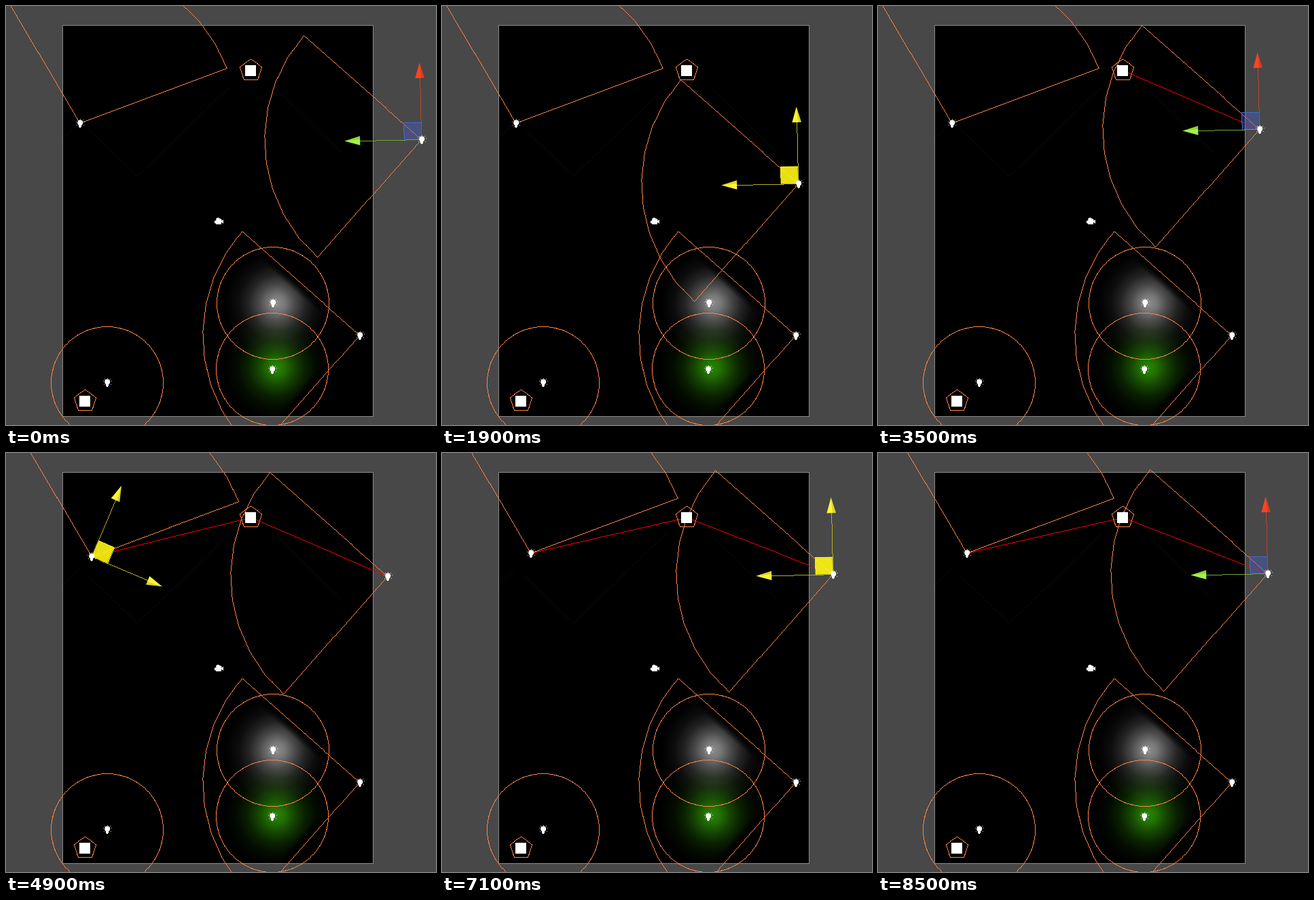
Recreate the animation shown at these times as an HTML page with a canvas. Size 633 px wide and 616 px high, loop 8.9 s.

```html
<!DOCTYPE html>
<html lang="en">
<head>
<meta charset="utf-8">
<title>2D light gizmos</title>
<style>
html, body { margin: 0; width: 100%; height: 100%; overflow: hidden; background: #484848; }
canvas { display: block; }
</style>
</head>
<body>
<canvas id="stage" width="633" height="616"></canvas>
<script>
const ctx = document.getElementById('stage').getContext('2d');
const LOOP = 8900, TICK = 100, RANGE = 231;
const ORANGE = '#ff8445', RED = '#f00000', FAINT = '#0a0a0a';
const target = { x: 360, y: 94.5 };
const spot = { x: 520.2, y: 483.7 };

// Drag paths: time, x, y
const rightPath = [
  [600, 611.2, 196], [800, 584, 182], [1000, 553, 165.7], [1100, 566, 171],
  [1300, 630, 186], [1500, 577, 174], [1700, 545, 215], [1900, 524.2, 261],
  [2000, 519, 266], [2200, 522, 250], [2400, 529, 214], [2600, 566, 190],
  [2800, 615, 178], [3000, 592, 178], [3200, 561.2, 181], [6300, 561.2, 181],
  [6500, 590, 180], [6700, 612, 179], [6900, 600, 178], [7100, 575.2, 178.2],
  [7250, 571, 179], [7500, 600, 182], [7700, 616, 184], [8000, 607, 184],
  [8300, 573.2, 177]
];
const leftPath = [[4600, 108.3, 172], [5000, 130.3, 147]];

// Handle state from each time on: time, owner, state
const handles = [
  [0, 'R', 'idle'], [300, 'R', 'axis'], [400, 'R', 'idle'], [500, 'R', 'plane'],
  [700, 'R', 'drag'], [3400, 'R', 'plane'], [3500, 'R', 'idle'],
  [4500, 'L', 'idle'], [4700, 'L', 'drag'], [5300, 'L', 'plane'], [5400, 'L', 'idle'],
  [6100, 'R', 'axis'], [6300, 'R', 'drag'], [8400, 'R', 'plane'], [8500, 'R', 'idle']
];

function follow(path, t) {
  const last = path[path.length - 1];
  if (t <= path[0][0]) return { x: path[0][1], y: path[0][2] };
  if (t >= last[0]) return { x: last[1], y: last[2] };
  const i = path.findIndex(p => p[0] > t) - 1;
  const a = path[i], b = path[i + 1];
  const u = (t - a[0]) / (b[0] - a[0]);
  const k = u * 0.5 + u * u * (3 - 2 * u) * 0.5;
  return { x: a[1] + (b[1] - a[1]) * k, y: a[2] + (b[2] - a[2]) * k };
}

// Hard one-pixel line without smoothing
function line(x0, y0, x1, y1, color) {
  const n = Math.max(1, Math.ceil(Math.max(Math.abs(x1 - x0), Math.abs(y1 - y0))));
  ctx.fillStyle = color;
  for (let i = 0; i <= n; i++) {
    ctx.fillRect(Math.round(x0 + (x1 - x0) * i / n), Math.round(y0 + (y1 - y0) * i / n), 1, 1);
  }
}

function polyline(points, color) {
  for (let i = 1; i < points.length; i++) line(...points[i - 1], ...points[i], color);
}

function fillPoly(points, color) {
  ctx.fillStyle = color;
  ctx.beginPath();
  points.forEach(p => ctx.lineTo(...p));
  ctx.closePath();
  ctx.fill();
}

function disc(x, y, r) {
  ctx.beginPath();
  ctx.arc(x, y, r, 0, Math.PI * 2);
  ctx.fill();
}

function polar(c, r, deg) {
  const a = deg * Math.PI / 180;
  return [c.x + r * Math.cos(a), c.y - r * Math.sin(a)];
}

function ring(c, r, sides) {
  const points = [];
  for (let i = 0; i <= sides; i++) points.push(polar(c, r, 90 + i * 360 / sides));
  polyline(points, ORANGE);
}

function cone(c, from, to) {
  const points = [[c.x, c.y]];
  for (let a = from; a <= to + 0.01; a += 10) points.push(polar(c, RANGE, a));
  points.push([c.x, c.y]);
  polyline(points, ORANGE);
}

function marker(c) {
  ring(c, 17, 5);
  ctx.fillStyle = '#fff';
  ctx.fillRect(c.x - 8, c.y - 7.5, 16, 16);
}

function bulb(c) {
  const x = Math.round(c.x + 0.3), y = Math.round(c.y);
  ctx.fillStyle = '#fff';
  disc(x + 0.2, y - 0.5, 4);
  ctx.fillRect(x - 2, y + 2, 4, 4);
  ctx.fillRect(x - 1, y + 6, 2, 1);
  ctx.fillStyle = 'rgba(255,255,255,0.75)';
  for (const a of [-25, 15, 52, 90, 128, 165, 205]) {
    const [px, py] = polar({ x, y }, 6, a);
    ctx.fillRect(Math.round(px), Math.round(py), 1, 1);
  }
}

function cameraIcon(x, y) {
  ctx.fillStyle = '#fff';
  disc(x - 1, y - 2, 2.8);
  disc(x + 2, y - 1, 2.5);
  disc(x - 4, y + 1.5, 2.3);
  ctx.fillRect(x - 4, y, 8, 5);
  fillPoly([[x + 3, y + 1], [x + 7, y - 2], [x + 7, y + 4]], '#fff');
}

function glow(x, y, r, rgb) {
  const g = ctx.createRadialGradient(x, y, 0, x, y, r);
  [[0, 1], [0.15, 0.86], [0.35, 0.52], [0.55, 0.25], [0.75, 0.09], [1, 0]]
    .forEach(([k, a]) => g.addColorStop(k, `rgba(${rgb},${a})`));
  ctx.fillStyle = g;
  ctx.fillRect(x - r, y - r, 2 * r, 2 * r);
}

// Darkens everything past one edge of the spot cone
function shadeEdge(deg, side) {
  ctx.save();
  ctx.translate(spot.x, spot.y);
  ctx.rotate(-deg * Math.PI / 180);
  ctx.scale(1, side);
  const g = ctx.createLinearGradient(0, 0, 0, 15);
  g.addColorStop(0, '#000');
  g.addColorStop(0.3, 'rgba(0,0,0,0.9)');
  g.addColorStop(1, 'rgba(0,0,0,0)');
  ctx.fillStyle = g;
  ctx.fillRect(0, -70, 236, 85);
  ctx.restore();
}

function scene() {
  ctx.fillStyle = '#484848';
  ctx.fillRect(0, 0, 633, 616);
  ctx.fillStyle = '#8b8b8b';
  ctx.fillRect(83, 28, 458, 576);
  ctx.fillStyle = '#000';
  ctx.fillRect(84, 29, 456, 574);
  polyline([[84, 193], [106, 171]], FAINT);
  polyline([[122, 181], [193, 250], [330, 117]], FAINT);
  polyline([[398, 122], [492, 214]], FAINT);

  ctx.save();
  ctx.beginPath();
  ctx.rect(84, 29, 456, 574);
  ctx.clip();
  ctx.globalCompositeOperation = 'lighter';
  glow(399, 437, 76, '140,140,140');
  glow(398, 532, 76, '40,132,4');
  ctx.globalCompositeOperation = 'source-over';
  shadeEdge(138.5, -1);
  shadeEdge(228.5, 1);
  ctx.restore();
}

function arrow(c, dx, dy, shaft, head) {
  const at = (along, across) => [c.x + dx * along - dy * across, c.y + dy * along + dx * across];
  line(c.x, c.y, ...at(90, 0), shaft);
  fillPoly([at(113, 0), at(90, 6.8), at(90, -6.8)], head);
  fillPoly([at(113, 0), at(90, 6.8), at(90, 2)], 'rgba(0,0,0,0.12)');
}

function gizmo(c, deg, state) {
  const a = deg * Math.PI / 180;
  const ux = Math.cos(a), uy = -Math.sin(a);
  const vx = uy, vy = -ux;
  const drag = state === 'drag';
  const size = 25.5;
  const corner = (p, q) => [c.x + size * (ux * p + vx * q), c.y + size * (uy * p + vy * q)];
  const square = [[0, 0], [1, 0], [1, 1], [0, 1], [0, 0]].map(p => corner(...p));
  const yellow = ['#b5ae22', '#fbf335'];
  const first = drag ? yellow : state === 'axis' ? ['#a3a169', '#e6e2a0'] : ['#bd4429', '#f94426'];
  const second = drag ? yellow : ['#70a838', '#a2f343'];
  const plane = drag ? ['rgba(255,245,20,0.91)', '#f3ea1e']
    : state === 'plane' ? ['rgba(230,226,150,0.42)', '#d5d190']
    : ['rgba(70,95,205,0.4)', '#4668c4'];
  fillPoly(square, plane[0]);
  polyline(square, plane[1]);
  arrow(c, ux, uy, ...first);
  arrow(c, vx, vy, ...second);
}

function sees(light) {
  const dx = target.x - light.x, dy = light.y - target.y;
  const deg = (Math.atan2(dy, dx) * 180 / Math.PI + 360) % 360;
  return Math.hypot(dx, dy) <= RANGE + 1 && deg >= 138.5 && deg <= 228.5;
}

function draw(t) {
  const right = follow(rightPath, t);
  const left = follow(leftPath, t);
  const [, owner, state] = handles.filter(h => h[0] <= t).pop();

  scene();
  if (sees(right)) {
    line(right.x, right.y, target.x, target.y, RED);
    if (left.x > 125) line(left.x, left.y, target.x, target.y, RED);
  }

  cone(left, 20.5, 120.5);
  cone(right, 138.5, 228.5);
  cone(spot, 138.5, 228.5);
  ring({ x: 392.5, y: 436.5 }, 82.5, 60);
  ring({ x: 391.5, y: 533.5 }, 82.5, 60);
  ring({ x: 148.5, y: 553.5 }, 82.5, 60);
  marker(target);
  marker({ x: 116, y: 580.5 });

  if (owner === 'R') gizmo(right, 91.3, state);
  else gizmo(left, -23, state);

  cameraIcon(313, 316);
  [left, right, spot, { x: 392.5, y: 436 }, { x: 391.5, y: 534 }, { x: 148.5, y: 553 }].forEach(bulb);
}

const start = performance.now();
function frame() {
  const t = (performance.now() - start) % LOOP;
  draw(Math.floor(t / TICK) * TICK);
  requestAnimationFrame(frame);
}
frame();
</script>
</body>
</html>
```
